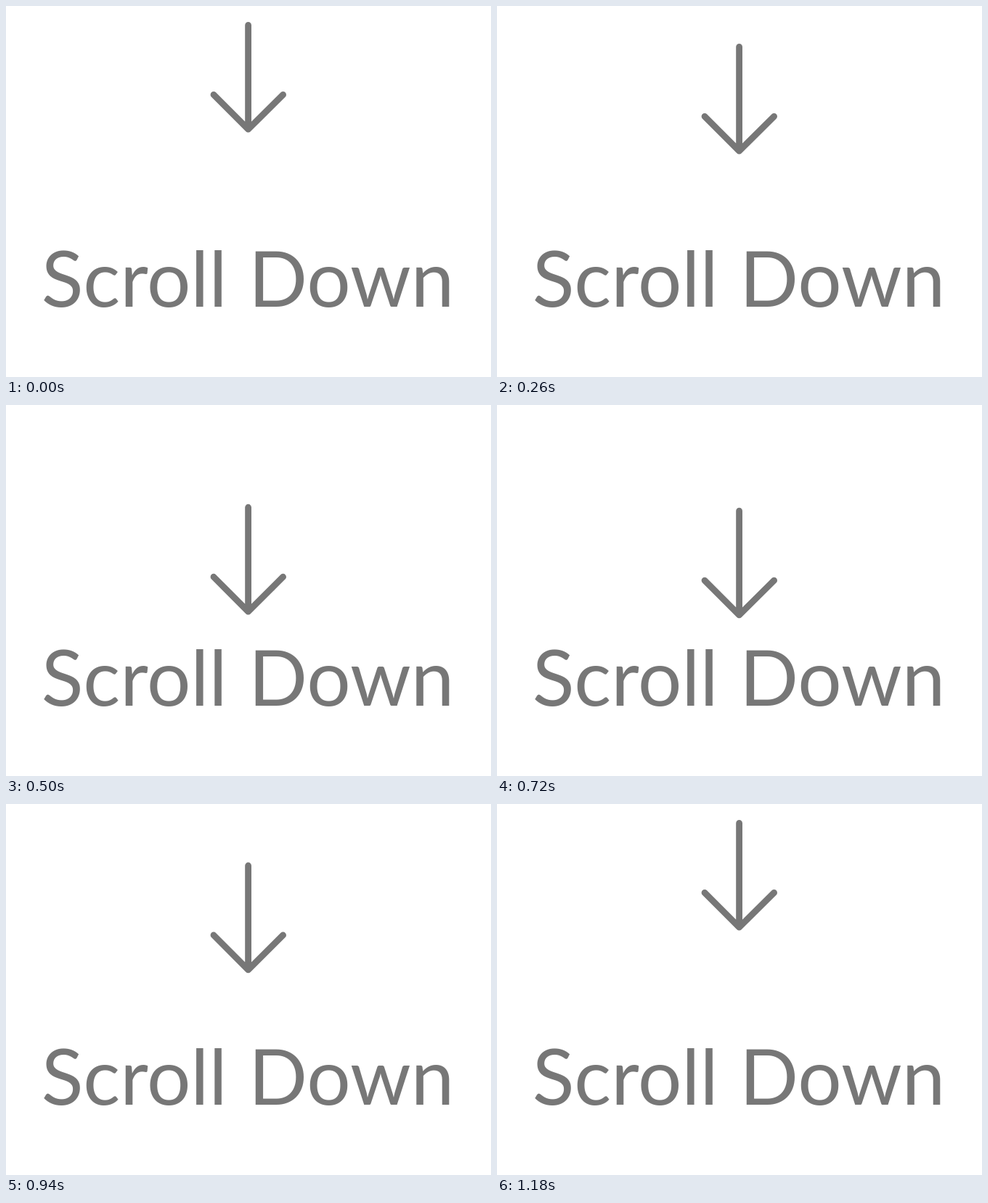
An HTML page for the animation above (1280 ms loop, 668 px wide and 512 px high).

```html
<!DOCTYPE html>
<html lang="en">
<head>
<meta charset="utf-8">
<title>Scroll Down</title>
<style>
  html, body { margin: 0; width: 100%; height: 100%; overflow: hidden; background: #fff; }
  svg { display: block; width: 668px; height: 512px; }
  path { fill: none; stroke: #777; stroke-width: 8.8; stroke-linecap: round; stroke-linejoin: round; }
  text { fill: #777; font: 106.67px Lato, sans-serif; text-anchor: middle; }
</style>
</head>
<body>
<svg viewBox="0 0 668 512">
  <path id="arrow" d="M333.6 26.4V170M286 122.4L333.6 170.2L381.6 122.4"/>
  <text y="415"><tspan x="190.4">Scroll</tspan> <tspan x="475.6">Down</tspan></text>
</svg>
<script>
  const LOOP = 1280, TICK = 20, STEPS = 25, TRAVEL = 121;
  const DOWN_AT = 100, UP_AT = 700;
  const arrow = document.getElementById('arrow');

  // Cubic Bezier from 0 to 1 with inner control values a and b
  const bezier = (a, b, s) => 3 * a * s * (1 - s) ** 2 + 3 * b * s * s * (1 - s) + s ** 3;

  // Same curve as cubic-bezier(.46, 0, .57, 1), solved by bisection
  function ease(p) {
    let low = 0, high = 1;
    for (let i = 0; i < 24; i++) {
      const mid = (low + high) / 2;
      if (bezier(0.46, 0.57, mid) < p) low = mid;
      else high = mid;
    }
    return bezier(0, 1, high);
  }

  // Eased progress of a move, held for one tick at a time
  function progress(time, start) {
    const step = Math.floor((time - start) / TICK) + 1;
    return ease(Math.min(Math.max(step / STEPS, 0), 1));
  }

  function draw(now) {
    const time = now % LOOP;
    const y = TRAVEL * (progress(time, DOWN_AT) - progress(time, UP_AT));
    arrow.setAttribute('transform', `translate(0 ${y.toFixed(2)})`);
    requestAnimationFrame(draw);
  }
  draw(0);
</script>
</body>
</html>
```
